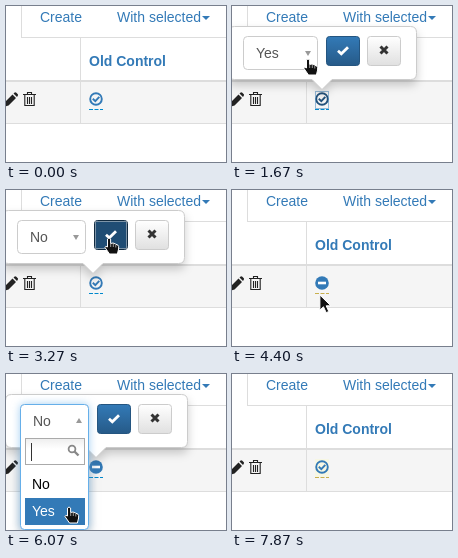
Animation of 220 by 156 pixels, one loop 8 s. Source, as an HTML page:

```html
<!DOCTYPE html>
<html>
<head>
<meta charset="utf-8">
<style>
  html, body { margin: 0; width: 100%; height: 100%; overflow: hidden; background: #fff; }
  svg { display: block; }
  text { font: 14px "Liberation Sans", Arial, sans-serif; fill: #555; }
  .link { fill: #337ab7; }
  .head { font-weight: bold; }
  .line { fill: #ddd; }
  #icon { color: #337ab7; }
  #pop { filter: drop-shadow(0 5px 5px rgba(0, 0, 0, .2)); }
  #menu { filter: drop-shadow(0 0 4px rgba(102, 175, 233, .6)); }
</style>
</head>
<body>
<svg width="220" height="156" viewBox="0 0 220 156">
  <defs>
    <linearGradient id="blue" x2="0" y2="1"><stop stop-color="#337ab7"/><stop offset="1" stop-color="#265a88"/></linearGradient>
    <linearGradient id="gray" x2="0" y2="1"><stop stop-color="#fff"/><stop offset="1" stop-color="#e0e0e0"/></linearGradient>
    <linearGradient id="inset" x2="0" y2="1"><stop stop-color="#eee"/><stop offset=".4" stop-color="#fff"/></linearGradient>
  </defs>
  <rect y="76" width="220" height="41" fill="#f5f5f5"/>
  <g class="line">
    <rect x="15" width="1" height="32"/>
    <rect x="15" y="31" width="205" height="1"/>
    <rect y="74" width="220" height="2"/>
    <rect x="74" y="32" width="1" height="86"/>
    <rect y="117" width="220" height="1"/>
  </g>
  <text class="link" x="34" y="16">Create</text>
  <text class="link" x="111" y="16">With selected</text>
  <path class="link" d="M196 10h8l-4 4z"/>
  <text class="link head" x="83" y="60">Old Control</text>

  <g fill="#222">
    <path d="M-1 96L6.5 88.5L10 92L2.5 99.5L-2 101zM7.5 87.5L9 86.2Q10 86 12 88.4Q12.3 89.5 11 91z"/>
    <path d="M17 88.5h13M21.5 88v-1.5h4v1.5M18.8 89v10.5h9.4v-10.5M21.5 91v7M23.5 91v7M25.5 91v7" fill="none" stroke="#222" stroke-width="1.1"/>
  </g>

  <rect id="flash" x="83" y="85" width="14" height="18" fill="#ffff80"/>
  <g id="icon">
    <g id="yes" fill="none" stroke="currentColor" stroke-width="1.9">
      <circle cx="90" cy="93" r="5.8"/>
      <path d="M86.8 92.8L89.3 95.2L93.3 90.8"/>
    </g>
    <g id="no">
      <circle cx="90" cy="93" r="6.8" fill="currentColor"/>
      <rect x="86" y="91.7" width="8" height="2.6" fill="#fff"/>
    </g>
  </g>
  <path id="under" d="M83 103.5h14" stroke-dasharray="4 1.5"/>
  <rect id="focus" x="83.5" y="85.5" width="13" height="17" fill="none" stroke="#337ab7" stroke-dasharray="1 1"/>

  <g id="pop">
    <path id="frame" fill="#fff" stroke="#ccc"/>
    <rect id="box" x="15.5" y="30.5" height="33" rx="4" fill="#fff" stroke="#ccc"/>
    <g id="buttons">
      <rect id="ok" x=".5" y="30.5" width="33" height="29" rx="3"/>
      <rect id="ring" x="1.5" y="31.5" width="31" height="27" fill="none" stroke="#ddd" stroke-dasharray="1 1"/>
      <path d="M12 44.8L15.3 47.8L22 41.3" fill="none" stroke="#fff" stroke-width="2.8"/>
      <rect x="41.5" y="30.5" width="33" height="29" rx="3" fill="url(#gray)" stroke="#ccc"/>
      <path d="M54.5 40.5L61.5 47.5M61.5 40.5L54.5 47.5" stroke="#333" stroke-width="3"/>
    </g>
    <g id="menu">
      <rect id="panel" x="15.5" y="30.5" height="125" rx="4" fill="#fff" stroke="#66afe9"/>
      <rect id="search" x="20.5" y="64.5" height="26" fill="url(#inset)" stroke="#aaa"/>
      <path d="M26.5 69v18" stroke="#333"/>
      <g id="lens" fill="none" stroke="#888" stroke-width="1.8">
        <circle cx="-15" cy="75" r="3.4"/>
        <path d="M-12.5 77.5L-8.5 81.5" stroke-width="2.4"/>
      </g>
      <rect id="mark" class="link" x="20" height="27"/>
      <text id="optNo" x="27" y="115">No</text>
      <text id="optYes" x="27" y="142">Yes</text>
    </g>
    <text id="value" x="28" y="52"></text>
    <path id="caret" fill="#999"/>
  </g>

  <g id="cursor" stroke="#fff" stroke-linejoin="round">
    <path id="arrow" d="M0 0V15L3.6 11.8L6.3 17.6L8.9 16.4L6.3 10.8H11z" fill="#111"/>
    <g id="hand">
      <path d="M-1.5 1Q0 -1 1.6 1V5.5L4 5L6.5 6L9 7.2Q10 8 9.6 11L8.4 16H.5L-4 9.5Q-3.6 7.4 -1.5 9z" fill="#111"/>
      <path d="M1.7 6v3M4.3 6v3M6.8 7v2.5" stroke-width=".6"/>
    </g>
  </g>
</svg>
<script>
const LOOP = 8000;
const el = {};
document.querySelectorAll('[id]').forEach(e => el[e.id] = e);

const clamp = v => Math.max(0, Math.min(1, v));
const ramp = (t, a, b) => clamp((t - a) / (b - a));
const within = (t, a, b) => t >= a && t < b;
const show = (e, on) => e.style.display = on ? '' : 'none';
const set = (e, attrs) => { for (const k in attrs) e.setAttribute(k, attrs[k]); };

// Two edits of the same cell; selectX is where the select gets clicked
const edits = [
  { from: 'Yes', to: 'No', come: 200, focus: 800, reach: 1270, open: 2130, pick: 2730, save: 3200, selectX: 76 },
  { from: 'No', to: 'Yes', come: 4210, focus: 4870, reach: 5050, open: 5530, pick: 6330, save: 6870, selectX: 51 }
];
const icon = [90, 93], away = [80, 150];
const selectWidth = v => v === 'No' ? 69 : 75;
const popLeft = e => Math.round(90 - (selectWidth(e.from) + 113) / 2);

const move = (start, time, to) => ({ start, end: start + time, to });
const moves = edits.flatMap(e => [
  move(e.come, 330, icon),
  move(e.reach, 330, [e.selectX, 53]),
  move(e.open + 70, 330, [63, e.to === 'No' ? 111 : 133]),
  move(e.pick, 300, [popLeft(e) + selectWidth(e.to) + 38, 48]),
  move(e.save + 330, 530, away)
]);

function cursorAt(t) {
  const i = moves.findLastIndex(m => t >= m.start);
  if (i < 0) return { x: 0, y: 0, shown: false };
  const { start, end, to } = moves[i];
  const from = i ? moves[i - 1].to : away;
  const k = Math.sin(ramp(t, start, end) * Math.PI / 2);
  const x = from[0] + (to[0] - from[0]) * k;
  const y = from[1] + (to[1] - from[1]) * k;
  const near = p => p !== away && Math.hypot(x - p[0], y - p[1]) < 12;
  const shown = t < moves[moves.length - 1].end;
  return { x, y, shown, hot: near(from) || near(to) };
}

function drawCursor(c, open) {
  const hand = open || c.hot;
  show(el.cursor, c.shown);
  set(el.cursor, { transform: `translate(${c.x} ${c.y})` });
  show(el.hand, hand);
  show(el.arrow, !hand);
}

function drawPopover(t, e, open, y) {
  const value = t < e.pick ? e.from : e.to;
  const w = selectWidth(value);
  const right = w + 113.5, mid = w / 2 + 56.5;
  const alpha = ramp(t, e.focus + 70, e.focus + 270) * (1 - ramp(t, e.save + 130, e.save + 330));
  show(el.pop, alpha > 0);
  set(el.pop, { transform: `translate(${popLeft(e)} 0)`, opacity: alpha });
  set(el.frame, { d: `M6.5 20.5H${right - 6}q6 0 6 6V67.5q0 6 -6 6H${mid + 10}l-10 10l-10 -10H6.5q-6 0 -6 -6V26.5q0 -6 6 -6z` });
  set(el.box, { width: w - 1 });
  set(el.buttons, { transform: `translate(${w + 23} 0)` });
  const pressed = t >= e.save;
  set(el.ok, { fill: pressed ? '#204d74' : 'url(#blue)', stroke: pressed ? '#122b40' : '#245580' });
  show(el.ring, pressed);
  el.value.textContent = value;
  set(el.caret, { d: `M${w + 2} ${open ? '49h6l-3 -5z' : '45h6l-3 5z'}` });

  show(el.menu, open);
  const onNo = y > 97 ? y < 124 : value === 'No';
  set(el.panel, { width: w - 1 });
  set(el.search, { width: w - 10 });
  set(el.lens, { transform: `translate(${w + 13} 0)` });
  set(el.mark, { width: w - 9, y: onNo ? 97 : 124 });
  el.optNo.style.fill = onNo ? '#fff' : '#000';
  el.optYes.style.fill = onNo ? '#000' : '#fff';
}

function drawCell(t, e) {
  const done = e.save + 330;
  const flashing = within(t, done, done + 1000);
  const focused = within(t, e.focus, e.open);
  const state = t < done ? e.from : e.to;
  show(el.yes, state === 'Yes');
  show(el.no, state === 'No');
  el.icon.style.color = focused ? '#23527c' : '';
  set(el.flash, { opacity: flashing ? 1 - ramp(t, done, done + 800) : 0 });
  set(el.under, { stroke: flashing ? '#c9b04e' : '#0088cc' });
  show(el.focus, focused);
}

function draw(t) {
  const e = edits[t < edits[1].focus ? 0 : 1];
  const open = within(t, e.open, e.pick);
  const c = cursorAt(t);
  drawCell(t, e);
  drawPopover(t, e, open, c.y);
  drawCursor(c, open);
}

function tick() {
  draw(performance.now() % LOOP);
  requestAnimationFrame(tick);
}
tick();
</script>
</body>
</html>
```
